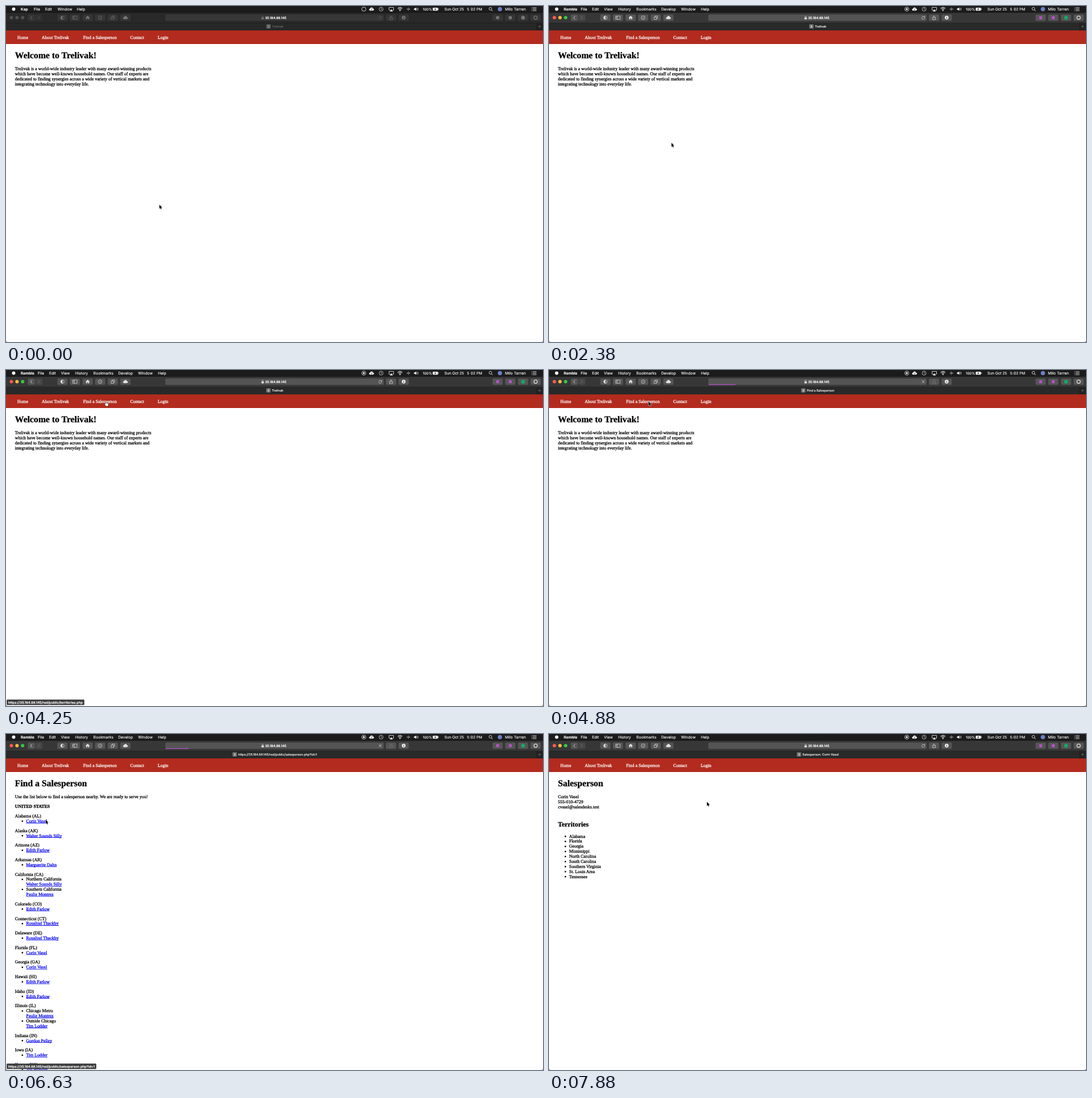
Recreate the animation shown at these times as an HTML page with a canvas. Size 947 px wide and 592 px high, loop 8000 ms.

```html
<!DOCTYPE html>
<html lang="en">
<head>
<meta charset="utf-8">
<style>
html, body { margin: 0; width: 947px; height: 592px; overflow: hidden; background: #fff; }
canvas { display: block; }
</style>
</head>
<body>
<canvas id="stage" width="947" height="592"></canvas>
<script>
const ctx = document.getElementById('stage').getContext('2d');
const LOOP = 8000, STEP = 125;
const SCALE = 947 / 1920;
const BODY = 16 * SCALE, LINE = 18 * SCALE;
const LEFT = 32 * SCALE, INDENT = 72 * SCALE;
const SERIF = '"Liberation Serif", serif', SANS = 'Inter, sans-serif';
const HOST = '35.184.88.145', BASE = `https://${HOST}/red/public/`;
const BRAND = 'Trelivak';
const REP = {
  corin: 'Corin Vasel', walter: 'Walter Sounds Silly', edith: 'Edith Farlow',
  marg: 'Marguerite Dahn', paulie: 'Paulie Montrez', ros: 'Rosalind Thackby',
  tim: 'Tim Lodder', gordon: 'Gordon Pelley', joy: 'Joy Brandle'
};

// Each state has either one salesperson or [region, salesperson] pairs.
const STATES = [
  ['Alabama (AL)', 'corin'], ['Alaska (AK)', 'walter'], ['Arizona (AZ)', 'edith'],
  ['Arkansas (AR)', 'marg'],
  ['California (CA)', [['Northern California', 'walter'], ['Southern California', 'paulie']]],
  ['Colorado (CO)', 'edith'], ['Connecticut (CT)', 'ros'], ['Delaware (DE)', 'ros'],
  ['Florida (FL)', 'corin'], ['Georgia (GA)', 'corin'], ['Hawaii (HI)', 'edith'],
  ['Idaho (ID)', 'edith'],
  ['Illinois (IL)', [['Chicago Metro', 'paulie'], ['Outside Chicago', 'tim']]],
  ['Indiana (IN)', 'gordon'], ['Iowa (IA)', 'tim'], ['Kansas (KS)', 'joy']
];
const TERRITORIES = ['Alabama', 'Florida', 'Georgia', 'Mississippi', 'North Carolina',
  'South Carolina', 'Southern Virginia', 'St. Louis Area', 'Tennessee'];

const POINTER = [
  [125, 270.5, 350], [750, 218.5, 324], [1250, 218.5, 324], [1500, 221, 271],
  [1750, 221, 271], [2375, 216, 241], [2500, 216, 241], [3375, 178, 58.5],
  [3750, 178, 58.5], [4250, 175.5, 55.5], [5500, 175.5, 55.5], [6250, 70, 151],
  [7750, 70, 151], [7875, 278.5, 119.5]
];
const FIRST_LOAD = [[4625, 300], [4875, 329], [5125, 430], [5250, 666]];
const SECOND_LOAD = [[6500, 302], [6625, 322], [7000, 430], [7250, 560], [7500, 666]];
const COLON_OFF = [[0, 875], [1875, 2875], [3875, 4875], [5875, 6625], [7000, 7875]];

const within = (t, a, b) => t >= a && t < b;

function track(keys, t, i = 1) {
  let k = 0;
  while (k < keys.length - 1 && keys[k + 1][0] <= t) k++;
  const a = keys[k], b = keys[k + 1];
  if (!b || t <= a[0]) return a[i];
  const u = (t - a[0]) / (b[0] - a[0]);
  return a[i] + (b[i] - a[i]) * u * u * (3 - 2 * u);
}

// A hairline outline gives the heavier look of smoothed screen type.
function text(s, x, y, size, { color = '#000', weight = 400, font = SERIF, outline = 0.28 } = {}) {
  ctx.font = `${weight} ${size}px ${font}`;
  ctx.fillStyle = ctx.strokeStyle = color;
  ctx.lineWidth = outline;
  ctx.lineJoin = 'round';
  ctx.fillText(s, x, y);
  if (outline) ctx.strokeText(s, x, y);
  ctx.lineJoin = 'miter';
  return ctx.measureText(s).width;
}

function ui(s, x, y, size, color = '#fff', weight = 400) {
  return text(s, x, y, size, { color, weight, font: SANS, outline: 0.15 });
}

function rect(x, y, w, h, color, r = 0) {
  ctx.fillStyle = color;
  ctx.beginPath();
  ctx.roundRect(x, y, w, h, r);
  ctx.fill();
}

function disc(x, y, r, color) {
  ctx.fillStyle = color;
  ctx.beginPath();
  ctx.arc(x, y, r, 0, 7);
  ctx.fill();
}

function stroke(d, color, x = 0, y = 0, width = 0.8) {
  ctx.save();
  ctx.translate(x, y);
  ctx.strokeStyle = color;
  ctx.lineWidth = width;
  ctx.stroke(new Path2D(d));
  ctx.restore();
}

function fill(d, color, x = 0, y = 0) {
  ctx.save();
  ctx.translate(x, y);
  ctx.fillStyle = color;
  ctx.fill(new Path2D(d));
  ctx.restore();
}

function ring(x, y, r, color, width = 0.8) {
  ctx.strokeStyle = color;
  ctx.lineWidth = width;
  ctx.beginPath();
  ctx.arc(x, y, r, 0, 7);
  ctx.stroke();
}

function cloud(x, y, color) {
  disc(x - 2.2, y + 0.8, 1.9, color);
  disc(x + 0.2, y - 0.6, 2.5, color);
  disc(x + 2.6, y + 0.8, 1.8, color);
  rect(x - 2.2, y + 0.8, 4.8, 1.9, color);
}

function menuBar(t, active) {
  const white = '#f4f4f4';
  rect(0, 0, 947, 11, '#1b1b1b');
  disc(13.5, 5.5, 3, white);
  ui(active ? 'Ramble' : 'Kap', 26, 8, 6.6, white, 700);
  const items = active
    ? [['File', 56], ['Edit', 76], ['View', 97], ['History', 122], ['Bookmarks', 154],
       ['Develop', 198], ['Window', 233], ['Help', 268]]
    : [['File', 49], ['Edit', 69], ['Window', 91], ['Help', 125]];
  for (const [label, x] of items) ui(label, x, 8, 6.7, white);

  ring(631, 5.5, 3.6, within(t, 1125, 1375) ? '#808080' : white, 0.8);
  if (t >= 1375) disc(631, 5.5, 1.7, white);
  cloud(644.5, 5.5, white);
  stroke('M0 -1V1.2L-1.8 2', '#1b1b1b', 645.3, 5.2, 0.7);
  ring(661.5, 5.5, 3.5, white, 0.7);
  stroke('M0 -2V0L1.6 1.2', white, 661.5, 5.5, 0.7);
  stroke('M-2 1.8H-4V-3H4V1.8H2', white, 679.5, 5.5);
  fill('M0 0L2.8 3.6H-2.8Z', white, 679.5, 5.8);
  for (const r of [2.2, 4.3, 6.2]) {
    ctx.strokeStyle = white;
    ctx.lineWidth = 1;
    ctx.beginPath();
    ctx.arc(694.8, 8.6, r, -2.35, -0.8);
    ctx.stroke();
  }
  disc(694.8, 8.2, 0.9, white);
  stroke('M0 -3V3M-2.4 -1V1M2.4 -1V1M-2.4 0H2.4', '#c8c8c8', 709.7, 5.5, 0.7);
  fill('M-4 -1.2H-2.4L0 -3V3L-2.4 1.2H-4Z', white, 723.5, 5.5);
  stroke('M1 -1.4Q2.2 0 1 1.4M2.4 -2.6Q4.6 0 2.4 2.6', white, 723.5, 5.5, 0.7);
  ui('100%', 735, 8, 6.1, white);
  rect(752.5, 3, 9.2, 5.2, white, 1);
  rect(762.2, 4.6, 0.9, 2, white);
  fill('M0.8 -2.4L-1.8 0.5H0L-0.8 2.4L1.8 -0.5H0Z', '#1b1b1b', 757, 5.6);
  ui('Sun Oct 25', 773, 8, 6.6, white);
  ui('5', 813, 8, 6.6, white);
  if (!COLON_OFF.some(([a, b]) => within(t, a, b))) ui(':', 817.4, 7.7, 6.6, white);
  ui('02 PM', 819.5, 8, 6.6, white);
  ring(854.2, 4.8, 2.4, white);
  stroke('M1.8 1.8L4 4.2', white, 854.2, 4.8, 0.9);
  disc(871, 5.5, 3.8, '#6d7fc4');
  ui('Milo Tarren', 880, 8, 6.9, white);
  stroke('M0 0H1M2.2 0H9M0 2.6H1M2.2 2.6H9M0 5.2H1M2.2 5.2H9', white, 926.5, 3, 0.9);
}

function toolbar(t, active) {
  const icon = active ? '#e2e2e2' : '#767676';
  const dim = active ? '#777' : '#555';
  const button = active ? '#555' : '#353535';
  const busy = within(t, 4625, 5500) || within(t, 6500, 7625);
  const canShare = !(within(t, 4625, 5750) || within(t, 6500, 7500));

  rect(0, 11, 947, 19, active ? '#373737' : '#292929');
  rect(0, 11, 947, 0.7, '#111');
  rect(0, 30, 947, 13, active ? '#292929' : '#272727');
  rect(0, 29.8, 947, 0.5, '#181818');
  ['#fc5b57', '#fdbc40', '#34c84a'].forEach((c, i) =>
    disc(9.5 + i * 9.9, 20.5, 3, active ? c : '#505050'));

  rect(38.5, 15, 12.4, 11.2, button, 2);
  rect(51.6, 15, 12.4, 11.2, active ? '#474747' : '#303030', 2);
  for (const x of [99.5, 121.5, 144, 166, 188.3, 210.5, 679, 701.3, 867, 889.3, 911.8, 934])
    rect(x - 9, 15, 18, 11.2, button, 2);

  stroke('M1.2 -2.8L-1.4 0L1.2 2.8', icon, 44.7, 20.6, 0.9);
  stroke('M-1.2 -2.8L1.4 0L-1.2 2.8', dim, 57.7, 20.6, 0.9);
  ring(99.5, 20.6, 3, icon);
  fill('M0 -3A3 3 0 0 0 0 3Z', icon, 99.5, 20.6);
  stroke('M-3.8 -2.8H3.8V2.8H-3.8ZM-1.2 -2.8V2.8M-3 -1.3H-2M-3 0H-2', icon, 121.5, 20.6, 0.7);
  fill('M0 -3.4L3.8 0H2.7V3H0.8V0.8H-0.8V3H-2.7V0H-3.8Z', icon, 144, 20.6);
  ring(166, 20.6, 3.2, icon, 0.7);
  stroke('M-1 1.2L1.4 -1.5', icon, 166, 20.6);
  stroke('M-3 -1H1.4V3H-3ZM-1.2 -1V-3H3V1.2H1.4', icon, 188.3, 20.6, 0.7);
  cloud(210.5, 20.5, icon);

  rect(281, 15, 385, 11.2, active ? '#545454' : '#373737', 2);
  rect(450.5, 20.2, 4.2, 3.2, icon, 0.5);
  stroke('M-1.2 0V-1.2A1.2 1.2 0 0 1 1.2 -1.2V0', icon, 452.6, 20.3, 0.7);
  ui(HOST, 457, 23, 5.65, '#fff', 600);
  if (busy) {
    const end = track(t < 6000 ? FIRST_LOAD : SECOND_LOAD, t);
    rect(281.5, 25, end - 281.5, 1.2, '#b453cd');
    stroke('M-2.3 -2.3L2.3 2.3M2.3 -2.3L-2.3 2.3', icon, 660, 20.6);
  } else {
    stroke('M2.1 -1.2A2.5 2.5 0 1 0 2.5 0.3M2.6 -3V-1H0.6', active ? icon : dim, 660, 20.8, 0.7);
  }
  const share = canShare ? icon : '#777';
  stroke('M-1 -0.8H-2.6V3.2H2.6V-0.8H1M0 1V-3.2M-1.5 -1.9L0 -3.4L1.5 -1.9', share, 679, 20.8, 0.7);
  disc(701.3, 20.6, 3.3, active ? '#f2f2f2' : icon);
  stroke('M0 -1.7V1.5M-1.3 0.3L0 1.6L1.3 0.3', button, 701.3, 20.6);
  for (const x of [867, 889.3]) rect(x - 2.6, 18, 5.2, 5.2, active ? '#b452c6' : icon, 0.5);
  disc(911.8, 20.6, 3.4, active ? '#16a765' : icon);
  ring(934, 20.6, 3, icon, 1.2);
  tab(t, active);
}

function tab(t, active) {
  let title = 'Salesperson: ' + REP.corin;
  if (t < 4750) title = BRAND;
  else if (t < 6500) title = 'Find a Salesperson';
  else if (t < 7000) title = BASE + 'salesperson.php?id=1';
  const weight = active ? 500 : 400;
  ctx.font = `${weight} 5.35px ${SANS}`;
  const x = 474 - (ctx.measureText(title).width + 10) / 2;
  rect(x, 32.2, 7.6, 7.6, active ? '#747474' : '#606060', 1.4);
  ui('3', x + 2.1, 38, 5.4, active ? '#eee' : '#a0a0a0', 500);
  ui(title, x + 10, 37.9, 5.35, active ? '#f2f2f2' : '#696969', weight);
  rect(935, 30, 12, 13, active ? '#222' : '#202020');
  stroke('M-2.5 0H2.5M0 -2.5V2.5', '#858585', 941, 36.2, 0.6);
}

function link(name, y) {
  const w = text(REP[name], INDENT, y, BODY, { color: '#0000ee' });
  rect(INDENT, y + 0.7, w, 0.8, '#0000ee');
}

function heading(s) {
  text(s, LEFT, 92, 32 * SCALE, { weight: 700 });
}

function lines(list, y) {
  list.forEach((s, i) => text(s, LEFT, y + i * LINE, BODY));
}

function homePage() {
  heading(`Welcome to ${BRAND}!`);
  lines([
    `${BRAND} is a world-wide industry leader with many award-winning products`,
    'which have become well-known household names. Our staff of experts are',
    'dedicated to finding synergies across a wide variety of vertical markets and',
    'integrating technology into everyday life.'
  ], 113.4);
}

function listPage() {
  heading('Find a Salesperson');
  lines(['Use the list below to find a salesperson nearby. We are ready to serve you!'], 113.4);
  text('UNITED STATES', LEFT, 130.2, BODY, { weight: 700 });
  const bullet = y => rect(27.7, y - 3.5, 2.4, 2.4, '#000');
  let y = 147;
  for (const [state, staff] of STATES) {
    text(state, LEFT, y, BODY);
    y += LINE;
    if (typeof staff === 'string') {
      bullet(y);
      link(staff, y);
      y += LINE;
    } else {
      for (const [region, name] of staff) {
        bullet(y);
        text(region, INDENT, y, BODY);
        link(name, y + LINE);
        y += 2 * LINE;
      }
    }
    y += BODY;
  }
}

function personPage() {
  heading('Salesperson');
  lines([REP.corin, '555-010-4729', 'cvasel@salesdesks.test'], 113.4);
  text('Territories', LEFT, 163, 24 * SCALE, { weight: 700 });
  TERRITORIES.forEach((s, i) => {
    const y = 182.6 + i * LINE;
    disc(28.9, y - 2.2, 1.35, '#000');
    text(s, INDENT, y, BODY);
  });
}

function navBar() {
  rect(0, 42.6, 947, 24.4, '#b22b1e');
  const items = [['Home', 20], [`About ${BRAND}`, 63], ['Find a Salesperson', 136],
    ['Contact', 219], ['Login', 267.5]];
  for (const [label, x] of items) text(label, x, 57.7, BODY, { color: '#fff' });
}

function statusBar(t) {
  const page = within(t, 3875, 4625) ? 'territories.php'
    : within(t, 6250, 7000) ? 'salesperson.php?id=1' : '';
  if (!page) return;
  const url = BASE + page, size = 5.76;
  ctx.font = `600 ${size}px ${SANS}`;
  const w = ctx.measureText(url).width + 6;
  rect(1, 580.6, w, 10, '#777', 1.5);
  rect(1.5, 581.1, w - 1, 9, '#3c3c3c', 1.2);
  ui(url, 4, 587.8, size, '#fff', 600);
}

function pointer(t) {
  const x = track(POINTER, t, 1), y = track(POINTER, t, 2);
  const hand = within(t, 3375, 4625) || within(t, 6250, 6500);
  const shape = hand
    ? 'M0 0.6Q0.7 -0.3 1.4 0.6V3L4.6 3.6Q5.2 4 5 5.2L4.2 8H0.8L-1.6 4.9Q-1.4 4 0 5Z'
    : 'M0 0V7.2L1.6 5.7L2.7 8.3L3.9 7.8L2.8 5.3H5Z';
  stroke(shape, hand ? '#000' : '#fff', x, y, 1);
  fill(shape, hand ? '#fff' : '#000', x, y);
}

function draw(time) {
  const t = Math.floor((time % LOOP) / STEP) * STEP;
  const active = t >= 875;
  ctx.textRendering = 'geometricPrecision';
  rect(0, 0, 947, 592, '#fff');
  if (t < 5500) homePage();
  else if (t < 7000) listPage();
  else personPage();
  navBar();
  toolbar(t, active);
  menuBar(t, active);
  statusBar(t);
  fill('M0 589.5Q0 592 2.5 592H0ZM947 589.5Q947 592 944.5 592H947Z', '#222');
  pointer(t);
}

const start = performance.now();
function tick() {
  draw(performance.now() - start);
  requestAnimationFrame(tick);
}
tick();
</script>
</body>
</html>
```
